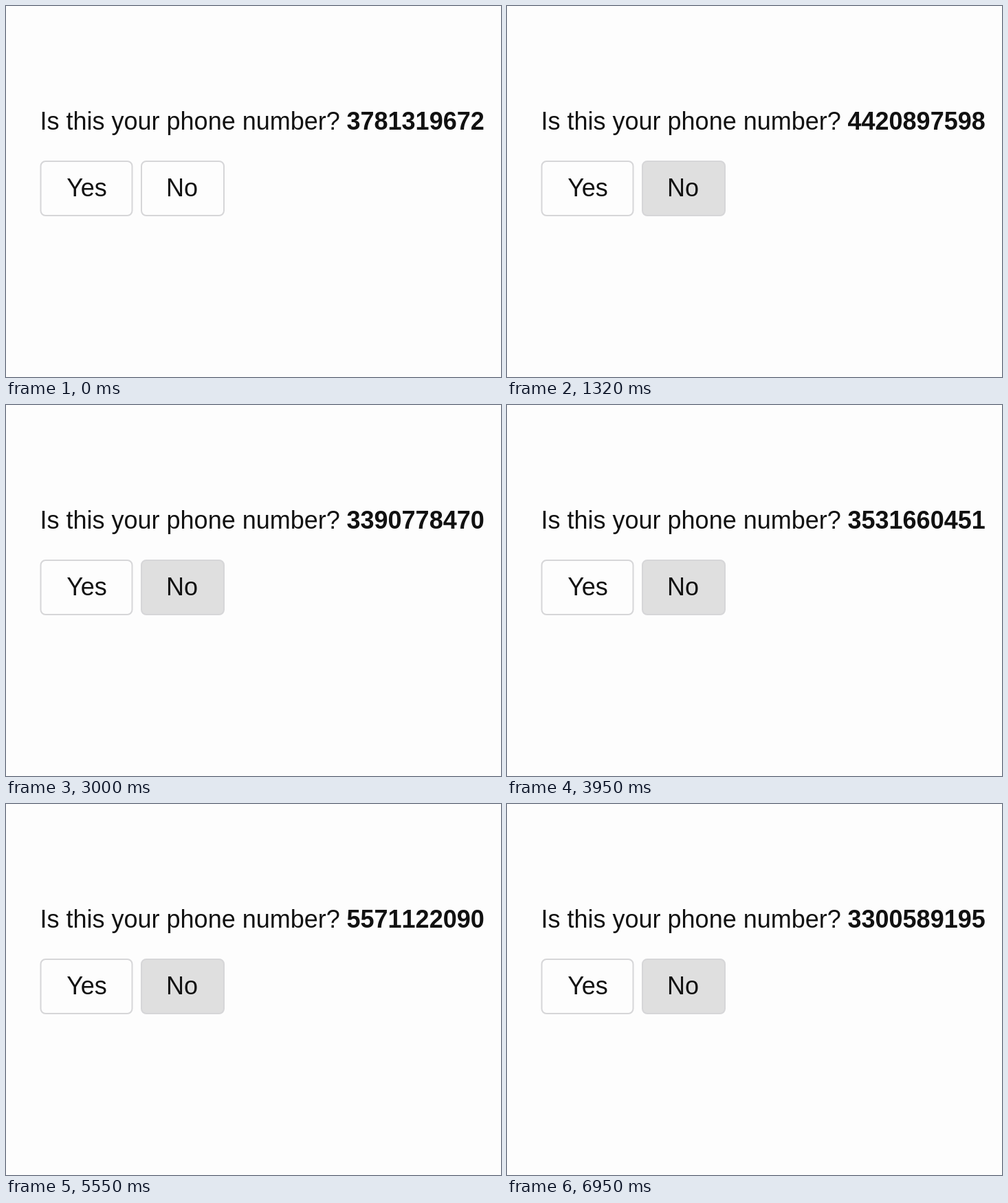
Animation of 720 by 540 pixels, one loop 6990 ms. Source, as an HTML page:

```html
<!DOCTYPE html>
<html lang="en">
<head>
<meta charset="utf-8">
<title>Phone number picker</title>
<style>
  html, body { margin: 0; height: 100%; overflow: hidden; background: #fdfdfd; }
  svg { display: block; }
  text { font: 36px "Liberation Sans", Arial, sans-serif; fill: #111; }
  #number { font-weight: bold; font-kerning: none; }
  rect { fill: #fdfdfd; stroke: #d6d6d8; stroke-width: 2; }
  .label { text-anchor: middle; }
  .pressed { fill: #dfdfdf; stroke: #d6d6d8; }
</style>
</head>
<body>
<svg width="720" height="540" viewBox="0 0 720 540">
  <text x="49.5" y="180">Is this your phone number?</text>
  <text id="number" x="495.5" y="180"></text>
  <rect x="50.5" y="226" width="133" height="79" rx="7"/>
  <text class="label" x="117.5" y="277">Yes</text>
  <rect id="no" x="197" y="226" width="120" height="79" rx="7"/>
  <text class="label" x="256" y="277">No</text>
</svg>
<script>
const LOOP = 6990;
// Bursts of clicking: start, end, number of changes
const bursts = [
  [180, 1500, 28],
  [1860, 1950, 3],
  [2180, 2550, 9],
  [2730, 5090, 50],
  [5230, LOOP, 39]
];
// Moments when the button is briefly let go
const releases = [450, 1100, 2350, 3200, 3700, 4450, 5600, 6280];
const RELEASE_TIME = 90;

const numberText = document.getElementById("number");
const noButton = document.getElementById("no");

function countAt(t) {
  let count = 0;
  for (const [start, end, steps] of bursts) {
    if (t < start) break;
    const progress = Math.min(1, (t - start) / (end - start));
    count += 1 + Math.floor(progress * (steps - 1));
  }
  return count;
}

function random(seed) {
  const x = Math.sin(seed * 12.9898 + 4.1) * 43758.5453;
  return x - Math.floor(x);
}

// Ten digits; the limits on two of them keep the number unassigned
function phoneNumber(count) {
  let digits = "";
  for (let i = 0; i < 10; i++) {
    const r = random(count * 10 + i + 1);
    digits += i === 0 ? 2 + Math.floor(r * 4) : Math.floor(r * (i === 3 ? 2 : 10));
  }
  return digits;
}

function isPressed(t) {
  return bursts.some(([start, end]) => t >= start && t < end) &&
    !releases.some(start => t >= start && t < start + RELEASE_TIME);
}

function draw() {
  const t = performance.now() % LOOP;
  numberText.textContent = phoneNumber(countAt(t));
  noButton.classList.toggle("pressed", isPressed(t));
  requestAnimationFrame(draw);
}
draw();
</script>
</body>
</html>
```
